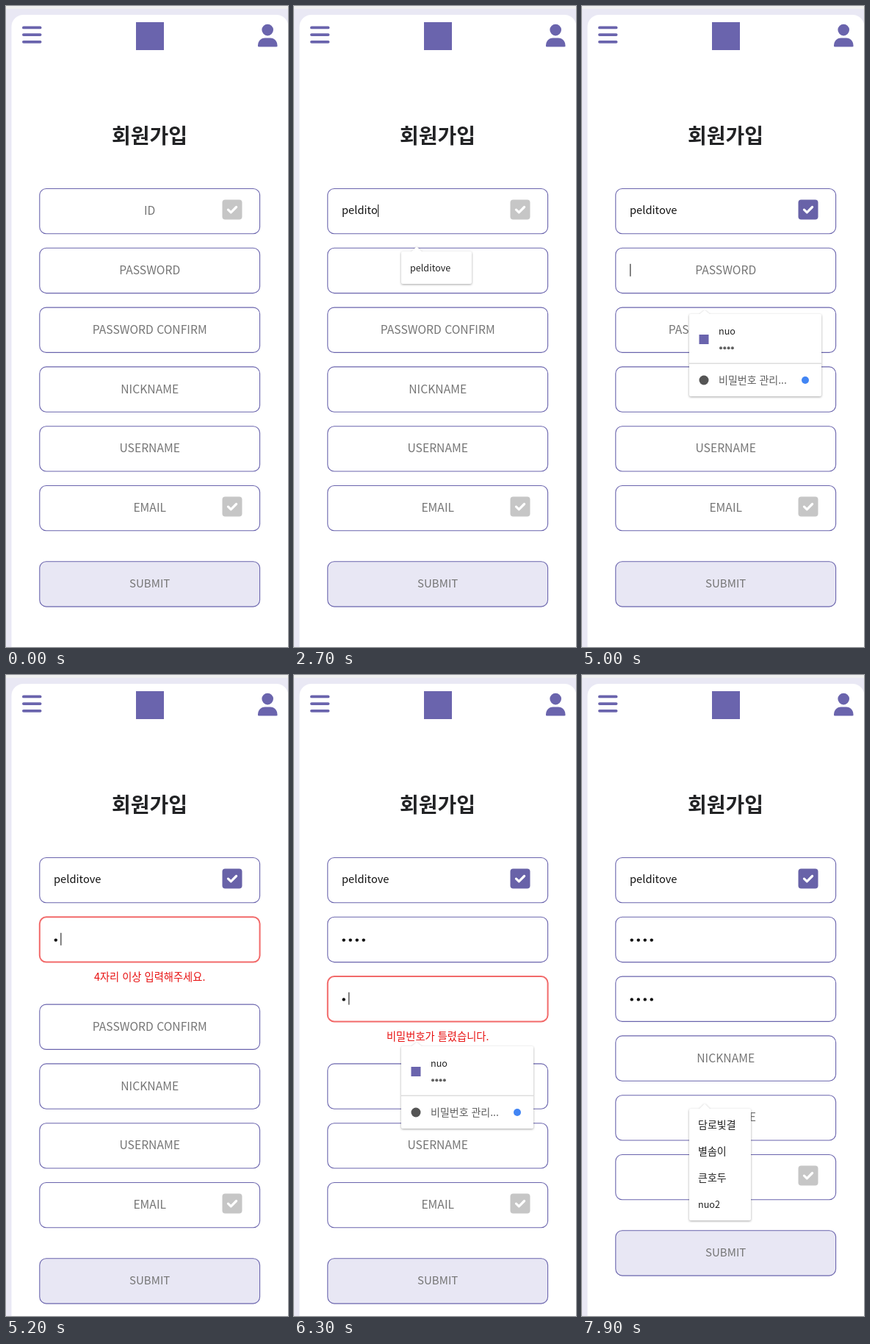
An HTML page that plays this animation: 384 px wide and 872 px high, repeating every 8 s.

```html
<!DOCTYPE html>
<html lang="ko">
<head>
<meta charset="utf-8">
<title>회원가입</title>
<style>
  html, body { margin: 0; width: 100%; height: 100%; overflow: hidden; background: #e9e8f4; }
  svg { display: block; width: 384px; height: 872px; }
  text { font-family: "Noto Sans CJK KR", "Noto Sans CJK JP", "Noto Sans CJK", sans-serif; white-space: pre; }
  .mid { text-anchor: middle; }
  .title { font-size: 28px; font-weight: 900; fill: #212224; }
  .box { fill: #fff; stroke: #6a64ad; stroke-width: 1.1; }
  .bad .box { stroke: #f26a6a; stroke-width: 2; }
  .label { font-size: 15.7px; fill: #757575; }
  .value { font-size: 14.7px; fill: #111; }
  .error { font-size: 14.3px; fill: #e81212; }
  .tick { fill: none; stroke: #fff; stroke-width: 3.2; stroke-linecap: round; stroke-linejoin: round; }
  .brand { fill: #6a64ad; }
  .popup { filter: drop-shadow(0 1px 1.5px rgba(0, 0, 0, .35)); }
  .popup .paper { fill: #fff; }
  .latin { font-size: 12.6px; fill: #222; }
  .hangul { font-size: 14px; fill: #222; }
  .soft { fill: #606060; }
</style>
</head>
<body>
<svg id="stage" viewBox="0 0 384 872">
  <rect width="384" height="872" fill="#e9e8f4"/>
  <rect width="384" height="4" fill="#f0f0f0"/>
  <rect x="7.5" y="12" width="377" height="900" rx="16" fill="#fff"/>
  <g class="brand">
    <rect x="22" y="27.5" width="26.5" height="3.8" rx="1.9"/>
    <rect x="22" y="37.2" width="26.5" height="3.8" rx="1.9"/>
    <rect x="22" y="46.9" width="26.5" height="3.8" rx="1.9"/>
    <rect x="177" y="22" width="38" height="38"/>
    <circle cx="356.2" cy="32.6" r="7.8"/>
    <path d="M343 54.2C343 47.8 347 43.6 352.5 43.6H360C365.500 43.6 369.500 47.8 369.500 54.2Q369.500 55.600 368 55.600H344.500Q343 55.600 343 54.2Z"/>
  </g>
  <text class="mid title" x="195.500" y="187">회원가입</text>
</svg>
<script>
const LOOP = 8000, STEP = 80.8, TOP = 248.5, SHIFT = 38;
const USER = 'pelditove';
const stage = document.getElementById('stage');

function add(parent, tag, attrs, content = '') {
  const node = document.createElementNS('http://www.w3.org/2000/svg', tag);
  for (const key in attrs) node.setAttribute(key, attrs[key]);
  node.textContent = content;
  return parent.appendChild(node);
}
const show = (node, on) => node.setAttribute('visibility', on ? 'visible' : 'hidden');
const countPast = (times, t) => times.filter(at => at <= t).length;

function addCheck(parent) {
  const back = add(parent, 'rect', { x: 294.5, y: 15, width: 27, height: 27, rx: 4, fill: '#c6c6c6' });
  add(parent, 'path', { class: 'tick', d: 'M302.5 28.7L306.3 32.3L313.6 25' });
  return back;
}

function addField(label, y) {
  const g = add(stage, 'g', {});
  add(g, 'rect', { class: 'box', x: 45.8, y: 0, width: 299.8, height: 61.3, rx: 9 });
  const hint = add(g, 'text', { class: 'mid label', x: 195.7, y: 35.7 }, label);
  return { g, y, hint };
}

const fields = ['ID', 'PASSWORD', 'PASSWORD CONFIRM', 'NICKNAME', 'USERNAME', 'EMAIL']
  .map((label, i) => addField(label, TOP + i * STEP));
const submit = addField('SUBMIT', 755.8);
submit.g.firstChild.style.fill = '#e8e7f4';
submit.hint.style.fontSize = '15px';
fields.push(submit);
const idCheck = addCheck(fields[0].g);
addCheck(fields[5].g);

const idValue = add(fields[0].g, 'text', { class: 'value', x: 65, y: 34.8 });
const dots = [1, 2].map(i => [0, 1, 2, 3].map(n =>
  add(fields[i].g, 'circle', { cx: 67.8 + 9 * n, cy: 31.3, r: 2.2, fill: '#111' })));
const errors = { 1: '4자리 이상 입력해주세요.', 2: '비밀번호가 틀렸습니다.' };
for (const i in errors)
  errors[i] = add(fields[i].g, 'text', { class: 'mid error', x: 195.7, y: 87 }, errors[i]);
const caret = add(stage, 'rect', { width: 1.1, height: 17, fill: '#222' });

function addPopup(y, w, h, arrow) {
  const g = add(stage, 'g', { class: 'popup', transform: `translate(146 ${y})` });
  add(g, 'rect', { class: 'paper', width: w, height: h, rx: 2 });
  add(g, 'path', { class: 'paper', d: `M13 1L21 ${-arrow}L29 1Z` });
  return g;
}

function addList(y, w, items) {
  const g = addPopup(y, w, 36 * items.length + 8, 7);
  items.forEach((item, i) => {
    const kind = /[가-힣]/.test(item) ? 'hangul' : 'latin';
    add(g, 'text', { class: kind, x: 12, y: 27.3 + 36 * i }, item);
  });
  return g;
}

function addLogin(y) {
  const g = addPopup(y, 180, 112, 5.5);
  add(g, 'rect', { class: 'brand', x: 13.5, y: 28, width: 13, height: 13 });
  add(g, 'text', { class: 'latin', x: 40, y: 28 }, 'nuo');
  for (let n = 0; n < 4; n++)
    add(g, 'circle', { class: 'soft', cx: 43 + 5.3 * n, cy: 46.3, r: 2 });
  add(g, 'path', { d: 'M0 67.2H180', stroke: '#ccc' });
  add(g, 'circle', { cx: 20, cy: 90, r: 6.5, fill: '#555' });
  add(g, 'text', { class: 'hangul soft', x: 40, y: 95 }, '비밀번호 관리...');
  add(g, 'circle', { cx: 158, cy: 90, r: 5, fill: '#4285f4' });
  return g;
}

const popups = [
  { from: 1100, to: 1300, g: addList(334, 108, [USER, 'nuo', 'nuo2']) },
  { from: 1300, to: 3400, g: addList(334, 96, [USER]) },
  { from: 4800, to: 5200, g: addLogin(419) },
  { from: 5900, to: 6400, g: addLogin(505) },
  { from: 7600, to: LOOP, g: addList(590, 84, ['담로빛결', '별솜이', '큰호두', 'nuo2']) }
];

// Focus span and key presses of each input in turn
const inputs = [
  { from: 1000, to: 4200, keys: [1300, 1600, 1800, 2000, 2300, 2500, 2700, 2900, 3200] },
  { from: 4700, to: 5800, keys: [5200, 5300, 5400, 5500] },
  { from: 5800, to: 7000, keys: [6300, 6400, 6600, 6800] },
  { from: 7400, to: LOOP, keys: [] }
];

function draw(t) {
  const typed = inputs.map(input => countPast(input.keys, t));
  idValue.textContent = USER.slice(0, typed[0]);
  idCheck.setAttribute('fill', t >= 4400 ? '#6862a8' : '#c6c6c6');

  let shift = 0;
  fields.forEach((field, i) => {
    field.top = field.y + shift;
    field.g.setAttribute('transform', `translate(0 ${field.top})`);
    show(field.hint, !typed[i]);
    if (!errors[i]) return;
    const bad = typed[i] > 0 && typed[i] < 4;
    field.g.setAttribute('class', bad ? 'bad' : '');
    show(errors[i], bad);
    dots[i - 1].forEach((dot, n) => show(dot, n < typed[i]));
    if (bad) shift += SHIFT;
  });

  const active = inputs.findIndex(input => t >= input.from && t < input.to);
  let lit = false;
  if (active >= 0) {
    const { from, keys } = inputs[active], count = typed[active];
    const last = count ? keys[count - 1] : from;
    const width = active ? 9 * count : count && idValue.getComputedTextLength();
    lit = (t - last) % 1000 < 500;
    caret.setAttribute('x', 65.3 + width);
    caret.setAttribute('y', fields[active].top + 21.5);
  }
  show(caret, lit);
  popups.forEach(({ from, to, g }) => show(g, t >= from && t < to));
}

const start = performance.now();
function tick() {
  draw((performance.now() - start) % LOOP);
  requestAnimationFrame(tick);
}
tick();
</script>
</body>
</html>
```
